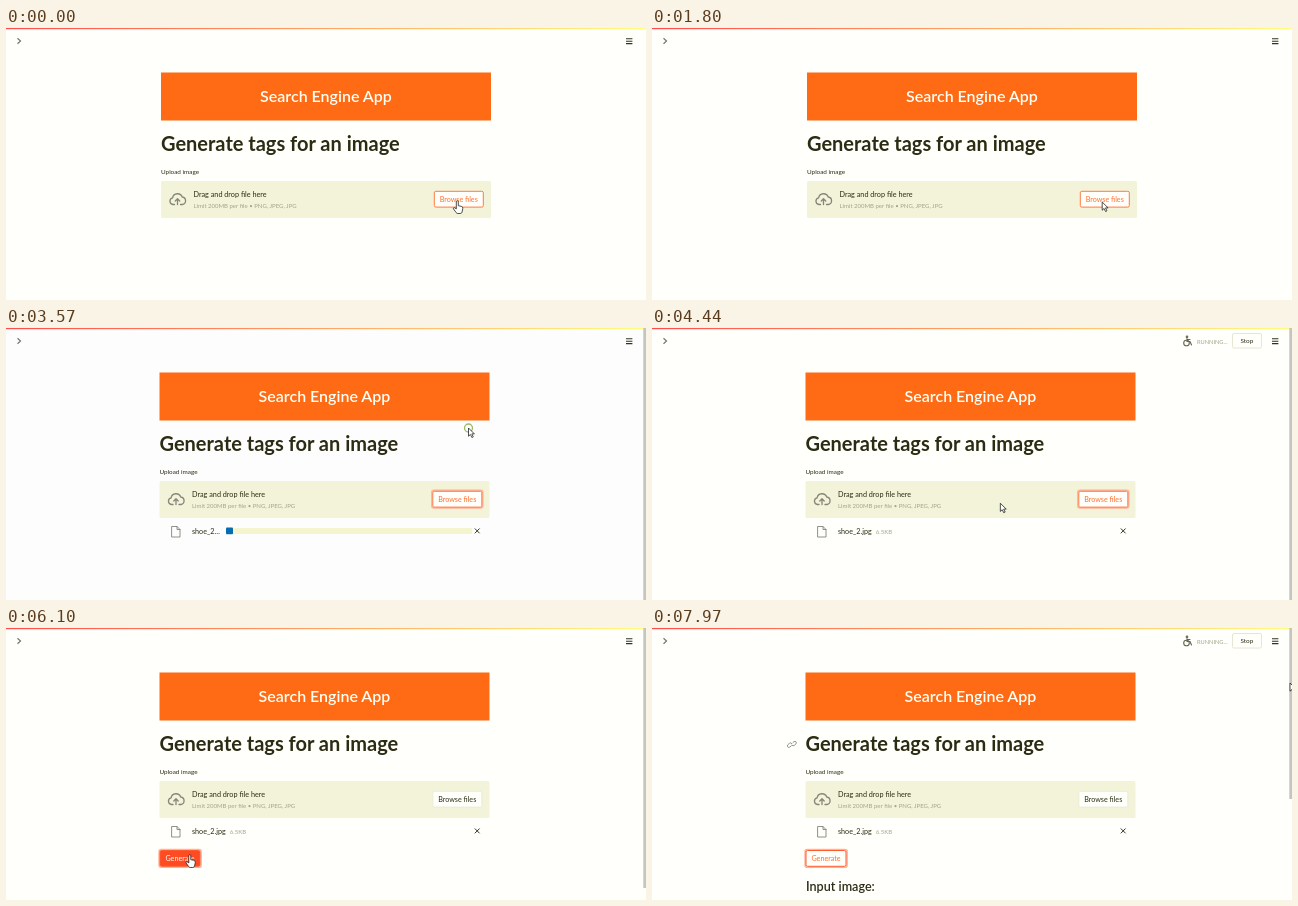
An HTML page for the animation above (8 s loop, 640 px wide and 272 px high).

```html
<!DOCTYPE html>
<html lang="en">
<head>
<meta charset="utf-8">
<title>Search Engine App</title>
<style>
  html, body { margin: 0; width: 100%; height: 100%; overflow: hidden; background: #fffffb; }
  svg { display: block; width: 100vw; height: 100vh; }
  text { font-family: Lato, "Open Sans", sans-serif; fill: #2c2c14; }
  #dialog text { font-family: "Open Sans", "Noto Sans", sans-serif; font-size: 5.6px; fill: #33331f; }
  .line { fill: none; stroke: #85857a; stroke-width: 1.1; stroke-linecap: round; stroke-linejoin: round; }
</style>
</head>
<body>
<svg viewBox="0 0 640 272" preserveAspectRatio="none">
  <defs>
    <linearGradient id="bar"><stop stop-color="#ff4b4b"/><stop offset="1" stop-color="#fffd80"/></linearGradient>
    <filter id="soft" x="-10%" y="-10%" width="120%" height="120%"><feGaussianBlur stdDeviation="3"/></filter>
  </defs>
  <rect id="paper" width="640" height="272" fill="#fffffb"/>
  <rect width="640" height="1.2" fill="url(#bar)"/>
  <path d="M11.5 10.3l3 2.7l-3 2.7" fill="none" stroke="#77776c" stroke-width="1.2"/>
  <path d="M620 10.8h6.4M620 13.2h6.4M620 15.6h6.4" stroke="#333320" stroke-width="1.1"/>

  <g id="running">
    <g class="line" id="poseA" style="stroke:#666652"><path d="M530 17h10M531 14.5h8M532 9l3 3l4-3M534 12l-2 2M535 12l3 2"/><circle cx="535.5" cy="9" r=".8"/></g>
    <g class="line" id="poseB" style="stroke:#666652"><path d="M535 10.5v3h3l1.5 3.5M535 11.5h3"/><circle cx="535" cy="8.8" r=".8"/><circle cx="534.5" cy="15" r="2.8"/></g>
    <text x="545" y="15.8" font-size="5.7" style="fill:#a5a58d">RUNNING...</text>
    <rect x="580.5" y="5.5" width="29" height="14.5" rx="1.5" fill="#fffffb" stroke="#e0e0c8" stroke-width=".8"/>
    <text x="588.5" y="15.2" font-size="6.4">Stop</text>
  </g>

  <g id="page">
    <rect x="155" y="44.5" width="330" height="48" fill="#ff6a14"/>
    <text x="320" y="74" font-size="16" font-weight="600" text-anchor="middle" style="fill:#fffff4">Search Engine App</text>
    <path id="link" class="line" d="M140.8 117.8l-1.6 1.3a1.5 1.5 0 0 1-2-2.2l1.8-1.6a1.5 1.5 0 0 1 2.2.2M142.4 114.6l1.1-1a1.5 1.5 0 0 1 2 2.2l-1.8 1.6a1.5 1.5 0 0 1-2.2-.2" style="stroke-width:.9"/>
    <g id="body">
      <text x="155" y="123.3" font-size="20" font-weight="700">Generate tags for an image</text>
      <text x="155" y="146" font-size="6.35">Upload image</text>
      <rect x="155" y="153" width="330" height="37" rx="1.5" fill="#f3f3d9"/>
      <path class="line" d="M168.5 176.5h-1.5a3.4 3.4 0 0 1-.4-6.700a5 5 0 0 1 9.600-.8a3.800 3.800 0 0 1 .3 7.500h-2M171.500 176.500v-5M169.300 173l2.200-2.200l2.200 2.200" style="stroke-width:1.3"/>
      <text x="187.500" y="168.700" font-size="7.250">Drag and drop file here</text>
      <text x="187.500" y="180.400" font-size="6" style="fill:#a3a38c">Limit 200MB per file • PNG, JPEG, JPG</text>
      <rect id="browseGlow" x="427.300" y="162.300" width="51" height="17.800" rx="2" fill="none" stroke="#ffb49a" stroke-width="1.500"/>
      <rect id="browse" x="428.300" y="163.300" width="49" height="15.800" rx="1.500" fill="#fffffb"/>
      <text id="browseText" x="452.700" y="173.700" font-size="7.200" text-anchor="middle">Browse files</text>
      <g id="file">
        <path class="line" d="M167.500 198.500h5l3 3v7.500h-8zM172.500 198.500v3h3" style="stroke-width:.9"/>
        <text id="fileName" x="187.500" y="205.700" font-size="7.200"></text>
        <g id="upload">
          <rect x="221.500" y="200" width="246" height="6" rx="1" fill="#f4f4cf"/>
          <rect x="221.500" y="199.600" width="7" height="6.600" rx="1" fill="#0a6cb0"/>
        </g>
        <text id="fileSize" x="225.300" y="205.500" font-size="6" style="fill:#a3a38c">6.5KB</text>
        <path d="M470.300 200.500l4.800 4.800m0-4.800l-4.800 4.800" stroke="#333320" stroke-width="1"/>
      </g>
    </g>
    <g id="generate">
      <rect id="genGlow" x="154.600" y="221.600" width="42" height="17.600" rx="2" fill="none" stroke="#ffb49a" stroke-width="1.600"/>
      <rect id="gen" x="155.500" y="222.500" width="40" height="15.800" rx="1.500"/>
      <text id="genText" x="175.500" y="232.800" font-size="7.200" text-anchor="middle">Generate</text>
    </g>
    <text id="input" x="155.500" y="263" font-size="12.600" font-weight="600">Input image:</text>
  </g>
  <rect id="scroll" x="637.300" width="2.700" fill="#c4c4c0"/>

  <g id="dialog"></g>

  <g id="cursor">
    <circle id="busy" r="4" fill="none" stroke="#9fb868" stroke-width="1.300"/>
    <path id="arrow" d="M0 0v8.200l1.900-1.700l1.500 3l1.400-.7l-1.500-2.900h2.600z" fill="#fffffb" stroke="#222" stroke-width=".8"/>
    <path id="hand" d="M-1.200-.3a1 1 0 0 1 2 0v4l3 .6q1.800.5 1.500 2.300l-.8 3.600q-.4 1.300-1.800 1.300h-2.400q-1 0-1.700-1l-2.700-3.700q-.3-1.200 1-1.200l1.900 1.300z" fill="#fffffb" stroke="#222" stroke-width=".8"/>
  </g>
</svg>
<script>
const LOOP = 8000;
const $ = id => document.getElementById(id);
const rect = (x, y, w, h, fill, more = '') => `<rect x="${x}" y="${y}" width="${w}" height="${h}" fill="${fill}" ${more}/>`;
const path = (d, fill, more = '') => `<path d="${d}" fill="${fill}" ${more}/>`;
const dot = (x, y, r, fill, more = '') => `<circle cx="${x}" cy="${y}" r="${r}" fill="${fill}" ${more}/>`;
const label = (x, y, s, more = '') => `<text x="${x}" y="${y}" ${more}>${s}</text>`;
const stroke = (c, w) => `stroke="${c}" stroke-width="${w}"`;

// Thumbnails, drawn around the centre of a 42 px cell.
const frame = (w, h, fill = '#fffff4') => rect(-w / 2, 21 - h, w, h, fill, stroke('#e6e6c8', .5));
const pack = path('M-12 20V-4q0-15 12-15t12 15v24z', '#3b3d3c') +
  path('M-8 6h16v11h-16zM-8-5h16M-5-19q5-5 10 0', 'none', stroke('#6a6c68', 1.2));
const sneaker = path('M-16 14V-6l9-5l5 7l18 11v7z', '#26292c') +
  path('M-17 13h35v4h-35z', '#f2f2e8') + path('M-5-3l-3 4m7-1l-3 4m8-1l-3 4', 'none', stroke('#e8e8dc', 1)) +
  dot(-9, 2, 2.5, '#e8e8dc');
const top_ = (c, shade) => path('M-12 20l-1-24l8-9h10l8 9l-1 24z', c) + dot(0, -16, 4, '#a9846a') +
  path('M0-12V20M-8-2V18M8-2V18', 'none', stroke(shade, 1));
const sock = (c, shade) => path('M-1-18h11l-1 18q-1 8-9 12l-9 6q-6 0-4-6l10-11z', c) +
  path('M-1-14h11M0-2l8 3', 'none', stroke(shade, 1));
const shades = (y, s) => `<g transform="translate(0 ${y}) scale(${s})">` + dot(-8, 2, 6.5, '#2b2b26') + dot(8, 2, 6.5, '#2b2b26') +
  path('M-15-2q15-5 30 0l3-5M-15-2l-3-3', 'none', stroke('#5a5138', 1.4)) + '</g>';

const files = [
  ['backpack', frame(31, 43) + pack],
  ['backpack_2', frame(42, 20) + '<g transform="translate(0 9) scale(1.1 .58)">' + pack + '</g>'],
  ['belt', frame(42, 42) + dot(0, -2, 13, 'none', stroke('#4a2c1c', 9)) + dot(0, -2, 13, 'none', stroke('#6d4630', 1)) + rect(-19, 5, 38, 9, '#4f3020') + rect(5, 4, 10, 11, 'none', stroke('#b3aa88', 1.5))],
  ['belt_2', frame(42, 33) + path('M-19-6L19-9V0L-19 6z', '#4b2418') + path('M-17 4L18 10v7L-17 11z', '#5f3020') + rect(-19, -6, 13, 17, 'none', stroke('#a3a396', 2))],
  ['deodorent', frame(19, 43) + rect(-6, -12, 12, 32, '#252320', 'rx="1"') + rect(-6, -8, 12, 13, '#d9281f') + rect(-4, -20, 8, 9, '#d9281f', 'rx="2"')],
  ['jacket', frame(30, 43) + top_('#6a4326', '#402616')],
  ['shirt', frame(30, 43) + top_('#a5d2c9', '#82b3aa')],
  ['shoe', frame(42, 42) + path('M-17 6V-11l11-6l7 11l13 8q6 4 5 12h-12l-8-5z', '#282724') + path('M-17 6l16 6l4 4h16', 'none', stroke('#55534a', 2))],
  ['shoe_2', frame(42, 42, '#159a9b') + sneaker],
  ['shoe_3', frame(38, 42, '#15a0a0') + '<g transform="rotate(8) scale(.95)">' + sneaker + '</g>'],
  ['socks', frame(31, 43) + sock('#1f1f1d', '#3d3d38')],
  ['socks_2', frame(29, 43) + sock('#c4c2b2', '#8f8d80')],
  ['sunglasses', frame(42, 30) + shades(5, 1)],
  ['sunglasses_2', frame(42, 23) + shades(10, .72)],
  ['wallet', frame(42, 37, '#fbfbe4') + rect(-20, -15, 40, 33, '#c71f26', 'rx="2"') + path('M-20-6H20', 'none', stroke('#8c141b', 1)) + dot(0, 2, 4, '#e4c9bf')],
  ['', frame(30, 39) + rect(-6, -17, 12, 38, '#8d8d86') + dot(0, 3, 11, '#a2a29a') + dot(0, 3, 8, '#45484a') + path('M0-2V3l4 2', 'none', stroke('#fff', .8))]
];
const cols = [307.5, 364, 417.5, 473, 528.5];
const rowMid = [45, 100, 155, 207];

const places = [
  [31, 0, 'Quick access', '#3b8fd0'], [43, 1, 'meera and tarun', '#ecc95c'],
  [58, 0, 'FileNook - Personal', '#2a84cc'], [69, 1, 'Documents', '#ecc95c'], [80.5, 1, 'Pictures', '#ecc95c'],
  [95.5, 0, 'This PC', '#3b9bd0'], [106.5, 1, '3D Objects', '#37a9c4'], [118, 1, 'Desktop', '#2a84cc'],
  [129, 1, 'Documents', '#9ab0b8'], [140.5, 1, 'Downloads', '#2a84cc'], [152, 1, 'Music', '#2a84cc'],
  [163, 1, 'Pictures', '#6fa8b8'], [174.5, 1, 'Videos', '#7a7f88'], [185.5, 1, 'Primary (C:)', '#8a9298'],
  [197, 1, 'VELTOR (D:)', '#8a9298'], [212, 0, 'Network', '#2f93cc']
];

function drawDialog() {
  const edge = stroke('#b9b99a', .7), blue = stroke('#2488d0', .9);
  let s = rect(201, -8, 370, 271, '#55553c', 'opacity=".4" filter="url(#soft)"') +
    rect(201, -2, 369, 264, '#fafad9', stroke('#8e8e74', .8)) +
    rect(201.500, 22, 368, 203, '#fdfde0') +
    path('M202 22H570M202 225.500H570M280.500 22V225', 'none', stroke('#e4e4c2', .7)) +
    label(210, 13, 'Organise') + path('M236 10.500h3l-1.500 1.800z', '#44442e') + label(252.500, 13, 'New folder') +
    rect(513, 8.500, 5.500, 5, '#7d9ba8') + path('M522.500 10.500h3l-1.500 1.800z', '#44442e') +
    rect(538, 8.500, 6.500, 5.500, '#fff', stroke('#3a6a9a', .8)) + rect(541.500, 8.500, 3, 5.500, '#6c9cc4') +
    dot(558, 11.300, 3.600, '#1673b8') + label(558, 13.200, '?', 'text-anchor="middle" style="fill:#fff"') +
    rect(202, 112.500, 72, 11.300, '#dadab4');
  for (const [y, level, name, color] of places) {
    const x = level ? 226 : 222.500;
    s += rect(x - 9.500, y - 2.600, 6.500, 5.200, color, 'rx="1"') + label(x, y + 2, name);
  }
  s += path('M269 41l3 3m-1-4l2 2m-3.500 1l-2 2', 'none', stroke('#66664e', .8)) +
    rect(562, 23, 6, 202, '#f5f5d6') + path('M563.500 27l1.700-2l1.700 2M563.500 220l1.700 2l1.700-2', 'none', stroke('#77775e', .8)) +
    rect(449, 131, 48.500, 56, '#e2f3ec', 'id="hoverLow"') + rect(449, 76, 48.500, 56, '#dcf0ee', 'id="hoverShoe"');
  files.forEach(([name, art], i) => {
    const x = cols[i % 5], row = Math.floor(i / 5), y = rowMid[row];
    s += `<g transform="translate(${x} ${y})">${art}</g>`;
    if (name) s += label(x, y + 28.400, name + '.jpg', 'text-anchor="middle"');
  });
  s += label(263, 238, 'File name:') + rect(290.500, 230, 176, 12, '#fffff0', blue) + path('M293 232.500v7', 'none', stroke('#333', .6)) +
    rect(472.500, 230, 89, 12, '#f3f3d2', edge) + label(475, 238, 'Custom Files (*.png;*.jpeg;*.jpg', 'style="font-size:5.200px"') +
    path('M556 235l1.700 2l1.700-2', 'none', stroke('#55553e', .8)) +
    rect(473, 244.500, 40, 11, '#eeeece', blue) + label(493, 252, 'Open', 'text-anchor="middle"') +
    rect(521, 244.500, 39, 11, '#eeeece', edge) + label(540.500, 252, 'Cancel', 'text-anchor="middle"');
  $('dialog').innerHTML = s;
}

// Pointer way points: time, x, y
const route = [[0, 451.500, 174], [2300, 450, 174], [2600, 450, 174], [2670, 462.500, 100], [3740, 462.500, 100],
  [4900, 288, 215], [5400, 288, 215], [5850, 184, 228], [6900, 184, 228], [7450, 380, 122], [7900, 638, 55], [8000, 638, 55]];

function pointer(t) {
  const i = route.findIndex(p => p[0] > t), [t0, x0, y0] = route[i - 1], [t1, x1, y1] = route[i];
  const u = (t - t0) / (t1 - t0), e = u * u * (3 - 2 * u);
  return [x0 + (x1 - x0) * e, y0 + (y1 - y0) * e];
}

const show = (id, on) => $(id).style.display = on ? '' : 'none';
const paint = (id, fill, line) => { $(id).style.fill = fill; if (line) $(id).style.stroke = line; };

function render(t) {
  const within = (a, b) => t >= a && t < b;
  const loading = within(3570, 3740), shifted = t >= 3570;

  paint('paper', within(2300, 3740) ? '#fdfdfe' : '#fffffb');
  $('page').setAttribute('transform', `translate(${shifted ? -1.5 : 0} 0)`);
  $('body').style.opacity = within(4570, 5400) ? 1 - .67 * Math.min(1, (t - 4570) / 770) ** 2 : 1;

  show('dialog', within(2300, 3200));
  show('hoverLow', t < 2640);
  show('hoverShoe', t >= 2640);

  show('file', shifted);
  show('upload', loading);
  show('fileSize', !loading);
  $('fileName').textContent = loading ? 'shoe_2…' : 'shoe_2.jpg';

  const focus = within(3200, 5900), hot = t < 2300 || focus;
  show('browseGlow', focus);
  paint('browse', '#fffffb', hot ? '#ff7a45' : '#ebebd6');
  paint('browseText', hot ? '#ff6f30' : '#2c2c14');

  const pressed = within(6000, 6240), lit = t >= 5800;
  show('generate', t >= 5400);
  show('genGlow', t >= 6000);
  paint('gen', pressed ? '#ff4b24' : '#fffffb', lit ? '#ff5a2c' : '#ebebd6');
  paint('genText', pressed ? '#fffff4' : lit ? '#ff6f30' : '#2c2c14');

  show('running', within(4300, 5400) || t >= 6400);
  const pose = Math.floor(t / 400) % 2;
  show('poseA', !pose);
  show('poseB', pose);
  show('input', t >= 7100);
  show('link', t >= 7300);
  show('scroll', shifted);
  $('scroll').setAttribute('height', t < 5400 ? 272 : t < 7100 ? 260 : 171);

  const hand = t < 270 || within(5780, 7000);
  const [x, y] = pointer(t);
  $('cursor').setAttribute('transform', `translate(${x} ${y})`);
  show('hand', hand);
  show('arrow', !hand);
  show('busy', within(3200, 3740));
}

drawDialog();
(function tick() {
  render(performance.now() % LOOP);
  requestAnimationFrame(tick);
})();
</script>
</body>
</html>
```
